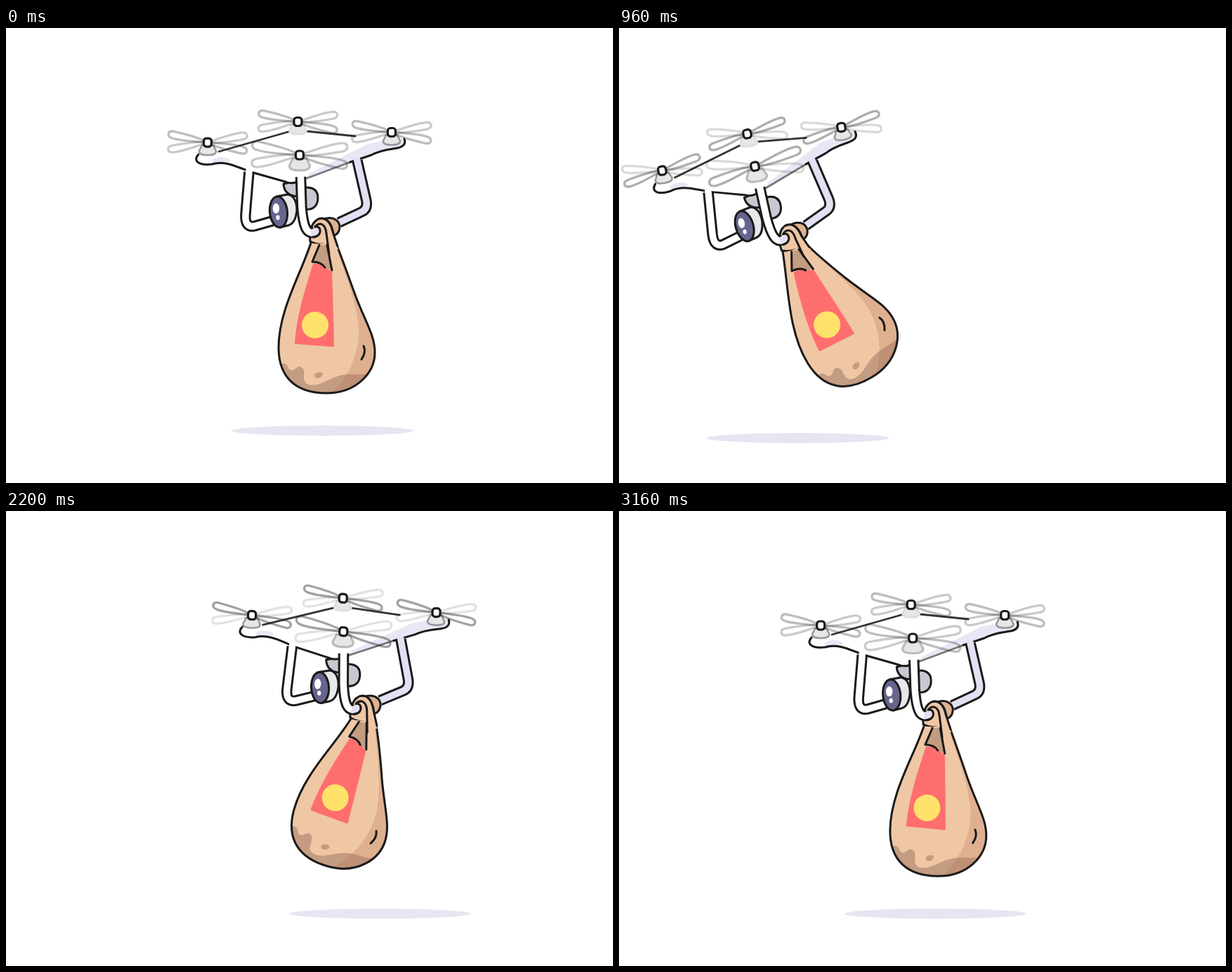
Animation, 864 px wide and 648 px high, one loop 3.2 s. Source, as an HTML page with a canvas:

```html
<!DOCTYPE html>
<html lang="en">
<head>
<meta charset="utf-8">
<title>Delivery drone</title>
<style>
html, body { margin: 0; width: 100%; height: 100%; overflow: hidden; background: #fff; }
canvas { display: block; }
</style>
</head>
<body>
<canvas id="stage" width="864" height="648"></canvas>
<script>
const ctx = document.getElementById('stage').getContext('2d');
const LOOP = 3200, CUT = 1380, RAD = Math.PI / 180;
const INK = '#1a1a1a', LILAC = '#e2e0f2', TAN = '#efc7a5', DARK_TAN = '#dfb191', BROWN = '#c49c82';

// Rows: time, x, y, tilt, bag swing, shadow x, shadow y, shadow alpha, blade mix
const leaving = [
  [0, 0, 0, 0, 0, 0, 0, 1, .5],
  [320, -21, 2.2, -2.6, -7.2, -12, 2, 1, .45],
  [640, -88, 7.5, -6.1, -14.1, -67.5, 5.5, 1, .4],
  [960, -228.5, 16.5, -10.4, -20.7, -195.5, 10.5, 1, .25],
  [1120, -335, 20, -12.3, -23, -300, 12.5, 1, .2],
  [CUT, -640, 26, -14, -26, -620, 15, 1, .1]
];
const arriving = [
  [CUT, 690, -118, 11, -18, 170, 0, 0, .95],
  [1480, 521, -95, 10, -15, 170, 0, 0, .95],
  [1680, 290, -49, 8, -8, 155, 0, 0, .88],
  [1880, 156, -23, 5.5, .9, 127, -.5, .38, .82],
  [2240, 55, -8, 2, 14.5, 77, 0, 1, .72],
  [2520, 20, -2.7, .2, 19.4, 42.5, 0, 1, .65],
  [2800, 4.5, -.5, 0, 14.5, 17, 0, 1, .58],
  [3160, .2, 0, 0, 1, .2, 0, 1, .5],
  [LOOP, 0, 0, 0, 0, 0, 0, 1, .5]
];

// Smooth curve through the rows
function pose(rows, t) {
  let i = 0;
  while (i < rows.length - 2 && t >= rows[i + 1][0]) i++;
  const a = rows[i], b = rows[i + 1], span = b[0] - a[0], u = (t - a[0]) / span;
  const before = rows[i - 1] || a, after = rows[i + 2] || b;
  return a.map((v, k) => {
    const m = (b[k] - before[k]) / (b[0] - before[0]) * span;
    const n = (after[k] - v) / (after[0] - a[0]) * span;
    const d = b[k] - v;
    return v + u * (m + u * (3 * d - 2 * m - n + u * (m + n - 2 * d)));
  });
}

const shape = d => new Path2D(d);

function draw(path, fill, stroke, width = 3) {
  if (fill) { ctx.fillStyle = fill; ctx.fill(path); }
  if (stroke) { ctx.strokeStyle = stroke; ctx.lineWidth = width; ctx.stroke(path); }
}

function oval(x, y, rx, ry, turn, fill, stroke) {
  const p = new Path2D();
  p.ellipse(x, y, rx, ry, turn, 0, 7);
  draw(p, fill, stroke);
}

function tube(path, fill) {
  ctx.lineCap = 'butt';
  draw(path, null, INK, 15.5);
  ctx.lineCap = 'square';
  draw(path, null, fill, 9.5);
  ctx.lineCap = 'round';
}

// Bends everything below the knot, like a hanging cloth
function bender(deg) {
  const full = deg * RAD, soft = 55;
  return d => shape(d.replace(/(-?[\d.]+) (-?[\d.]+)/g, (_, x, y) => {
    const s = y - 290, off = x - 452;
    if (s <= 0) return `${x} ${y}`;
    const near = Math.min(s, soft), far = s - near, a = full * near / soft;
    const px = 452 - near * Math.sin(a / 2) - far * Math.sin(a) + off * Math.cos(a);
    const py = 290 + near * Math.cos(a / 2) + far * Math.cos(a) + off * Math.sin(a);
    return `${px.toFixed(2)} ${py.toFixed(2)}`;
  }));
}

const body = shape('M274 180C265 190 276 196 293 194C306 190 318 193 330 198L352 206L398 219Q404 222 412 220L490 191L520 181C535 173 548 173 557 171C568 169 569 163 567 158L540 157L425 146L405 146L300 175Z');
const bodyShade = shape('M425 216L432 207L515 165L570 154L572 175L520 184Z');
const blade = shape('M4 -1C20 -4 35 -8 49 -8Q57 -8 57 -3Q57 2 48 2C30 3 15 3 4 1');
const motor = shape('M-8 4L8 4L12 12Q13 18 0 18Q-13 18 -12 12Z');
const nut = new Path2D();
nut.roundRect(-5.5, -6, 11, 12, 4);

function drawRotor(x, y, size, stroke, mix) {
  ctx.save();
  ctx.translate(x, y);
  ctx.save();
  ctx.scale(size, size);
  draw(motor, '#e6e6e6', stroke, 2.6);
  for (const [turn, alpha] of [[16, .52 * mix + .04], [-7, .48 * (1 - mix)]]) {
    ctx.globalAlpha = Math.max(0, alpha);
    for (const half of [0, 180]) {
      ctx.save();
      ctx.rotate((turn + half) * RAD);
      draw(blade, null, '#222', 3.3 / size);
      ctx.restore();
    }
  }
  ctx.restore();
  draw(nut, '#fff', INK, 3.2);
  ctx.restore();
}

function drawBody() {
  draw(shape('M395 222C396 235 405 240 418 240L425 258C437 260 444 253 444 242C444 232 438 227 427 227L422 216Z'), '#c9c8d2', INK);
  draw(body, '#fff');
  ctx.save();
  ctx.clip(body);
  draw(bodyShade, '#e9e7f6');
  oval(306, 189, 13, 5, 0, '#e9e7f6');
  ctx.restore();
  draw(shape('M303 176L405 147M428 147L497 154'), null, '#333', 2.8);
  draw(shape('M412 220L490 191'), null, '#777', 2.8);
  draw(shape('M274 180C265 190 276 196 293 194C306 190 318 193 330 198L352 206L398 219Q404 222 412 220M490 191L520 181C535 173 548 173 557 171C568 169 569 163 567 158'), null, INK);
  tube(shape('M346 205L341 266Q340 285 354 282L382 274'), '#fff');
  tube(shape('M500 189L513 246Q515 258 506 262L474 277'), LILAC);
  // Camera
  draw(shape('M385 240L401 237C410 238 414 248 414 259C413 272 409 279 402 281L390 284Z'), '#e8e8ea', INK);
  oval(388, 262, 12.5, 22, -.1, '#66658d', INK);
  oval(384.5, 257, 4.7, 7.3, 0, '#fff');
  oval(387, 270, 2.6, 3.4, 0, '#fff');
}

function drawBag(bend) {
  draw(bend('M450 273C464 267 475 273 475 284C474 294 468 297 458 297Z'), DARK_TAN, INK);
  draw(bend('M433 304C431 290 435 274 448 271C459 271 464 281 466 293L467 306Q446 311 433 304Z'), TAN, INK);
  tube(shape('M419.5 212L421 255C423 282 428 296 440 290'), '#fff');
  draw(shape('M434 287L443 284Q448 289 442 295L434 297Z'), LILAC);
  draw(shape('M440 283Q448 282 447 291Q445 297 438 298'), null, INK);

  const sack = bend('M434 306C420 350 388 402 388 455C388 500 415 520 456 520C500 520 525 490 525 462C525 438 512 420 497 380C487 352 480 333 469 302Q446 310 434 306Z');
  draw(sack, TAN);
  ctx.save();
  ctx.clip(sack);
  draw(bend('M385 480C398 475 400 479 403 486C408 490 412 485 416 482C424 483 425 488 424 496C423 507 432 510 441 508C456 506 464 494 490 493Q510 494 530 490L530 530L385 530Z'), BROWN);
  draw(bend('M439 495C440 490 449 489 451 492C451 498 441 502 439 495Z'), BROWN);
  draw(bend('M466 300C480 345 498 385 502 425C504 462 488 499 458 524L540 530L540 420Z'), 'rgba(175,110,80,.25)');
  ctx.restore();
  draw(bend('M437 336Q450 334 455 341L464 347Q466 398 467 453Q466 455 464 454L412 450Q410 449 411 446C415 405 426 371 437 336Z'), '#ff6e6e');
  draw(bend('M440 404C450.5 404 459 412.5 459 423C459 433.5 450.5 442 440 442C429.5 442 421 433.5 421 423C421 412.5 429.5 404 440 404Z'), '#ffe26a');
  draw(bend('M446 309L436 333Q449 333 454 341L464 345L457 309Z'), BROWN);
  draw(bend('M446 309L436 333Q449 333 454 341M464 345L457 309'), null, INK);
  draw(bend('M434 306C420 350 388 402 388 455C388 500 415 520 456 520C500 520 525 490 525 462C525 438 512 420 497 380C487 352 480 333 469 304M509 453Q513 462 506 472'), null, INK);
  // Strap over the knot
  draw(bend('M440 283C447 275 455 280 456 292L460 318L473 315L465 290C462 276 455 269 445 272Z'), TAN);
  draw(bend('M440 283C447 275 455 280 456 292L460 322M472 311L465 290C462 276 455 269 445 272'), null, INK);
}

function render(t) {
  const [, x, y, tilt, swing, sx, sy, alpha, mix] = pose(t < CUT ? leaving : arriving, t);
  ctx.clearRect(0, 0, 864, 648);
  ctx.lineJoin = ctx.lineCap = 'round';
  ctx.globalAlpha = Math.min(1, Math.max(0, alpha));
  oval(450.5 + sx, 573.5 + sy, 129.5, 7.2, 0, '#e6e5f2');
  ctx.globalAlpha = 1;
  ctx.save();
  ctx.translate(418 + x, 156 + y);
  ctx.rotate(tilt * RAD);
  ctx.translate(-418, -156);
  drawBody();
  drawBag(bender(swing));
  drawRotor(415.5, 133.5, 1, '#ddd', mix);
  drawRotor(549, 148.5, 1, '#999', mix);
  drawRotor(287, 163, 1, '#999', mix);
  drawRotor(418, 181, 1.21, '#bbb', mix);
  ctx.restore();
}

const start = performance.now();
function tick() {
  render((performance.now() - start) % LOOP);
  requestAnimationFrame(tick);
}
tick();
</script>
</body>
</html>
```
